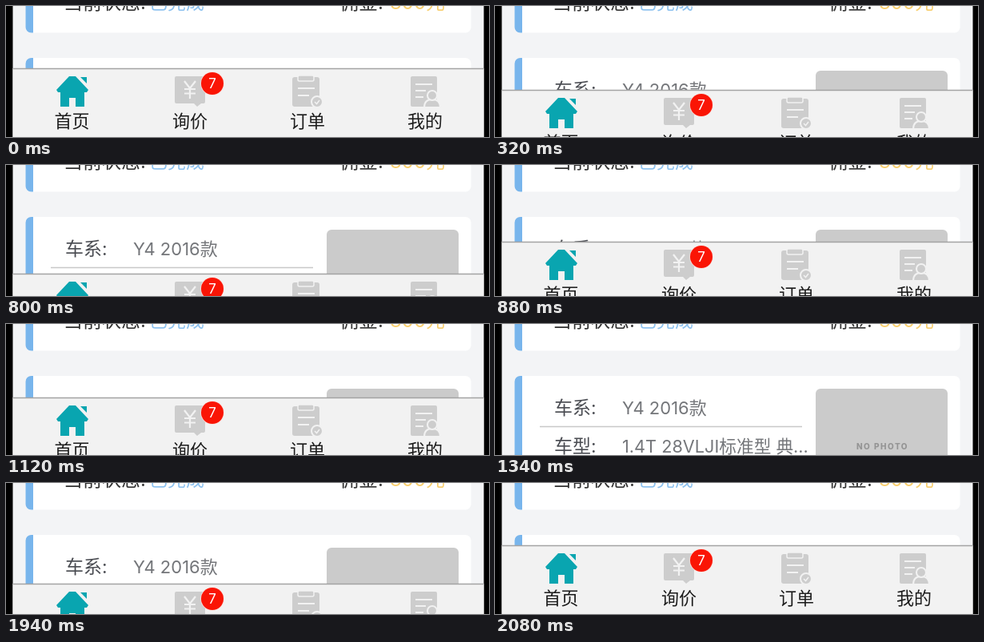
Animation of 604 by 164 pixels, one loop 2200 ms. Source, as an HTML page:

```html
<!DOCTYPE html>
<html lang="zh">
<head>
<meta charset="utf-8">
<style>
html, body { margin: 0; width: 100%; height: 100%; overflow: hidden; background: #000; }
svg { display: block; }
text { font-family: Inter, "Noto Sans CJK SC", "Noto Sans CJK", sans-serif; font-size: 22px; }
.head { font-size: 24px; fill: #333; }
.label { font-size: 23px; fill: #4a4c52; }
.value { fill: #74767a; }
.tab { fill: #1c1c1c; text-anchor: middle; }
.grey { fill: #cdcdcd; }
.line { stroke: #f2f2f2; stroke-width: 2.2; fill: none; }
</style>
</head>
<body>
<svg width="604" height="164" viewBox="0 0 604 164">
  <defs>
    <clipPath id="screen"><rect x="8.5" width="589" height="164"/></clipPath>
    <clipPath id="cards">
      <rect x="24.500" y="-40" width="557" height="73.5" rx="7"/>
      <rect x="24.500" y="65" width="557" height="140" rx="7"/>
    </clipPath>
  </defs>
  <g clip-path="url(#screen)">
    <rect width="604" height="164" fill="#f3f4f6"/>
    <g clip-path="url(#cards)">
      <rect width="604" height="164" fill="#fff"/>
      <rect x="24" width="10" height="164" fill="#78b5ec"/>
    </g>

    <text class="head" x="72" y="4">当前状态:</text>
    <text class="head" x="179" y="4" style="fill:#8cc1ef;font-size:23px">已完成</text>
    <text class="head" x="417" y="4">佣金:</text>
    <text class="head" x="480" y="4" style="fill:#f8cf70">300元</text>

    <text class="label" x="74" y="113">车系:</text>
    <text class="value" x="159" y="112.500">Y4 2016款</text>
    <path d="M56 128.500H384" stroke="#c8c8c8" stroke-width="1.5"/>
    <text class="label" x="74" y="161">车型:</text>
    <text class="value" x="159" y="160.500" style="font-size:21.7px">1.4T 28VLJI标准型 典...</text>
    <rect x="401" y="81" width="165" height="120" rx="6" fill="#cbcbcb"/>
    <text x="484.500" y="157" text-anchor="middle" style="font-size:10px;font-weight:800;letter-spacing:1.5px;fill:#949494">NO PHOTO</text>

    <g id="bar">
      <rect x="8" y="78" width="590" height="100" fill="#f2f2f2"/>
      <path d="M8 78.500H598" stroke="#a3a3a3" stroke-width="1.5"/>

      <g fill="#09a5b0">
        <path d="M79 88H87L103 105L101 108H98V126H87V115H79V126H68V108H65L63 105Z"/>
        <path d="M93 89H101V97Z"/>
      </g>

      <path class="grey" d="M213 88H247Q249 88 249 90V120Q249 122 247 122H244L239 126L235 122H213Q211 122 211 120V90Q211 88 213 88Z"/>
      <path class="line" d="M223 94L230 103L237 94M230 103V116M223 104H237M223 109.500H237"/>
      <circle cx="258" cy="97" r="14.8" fill="#fbdcd8"/>
      <circle cx="258" cy="97" r="14" fill="#fa1505"/>
      <text x="258" y="103" text-anchor="middle" style="font-size:17px;fill:#fff">7</text>

      <rect class="grey" x="358" y="89" width="34" height="37" rx="3"/>
      <rect x="365" y="87" width="20" height="7" rx="2" fill="#cdcdcd" stroke="#f2f2f2" stroke-width="1.5"/>
      <path class="line" d="M365 103H386M365 112H379"/>
      <circle class="grey" cx="389" cy="120" r="7" stroke="#f2f2f2" stroke-width="2"/>
      <path class="line" d="M386 120L388.500 122.500L392 118" style="stroke-width:1.5"/>

      <rect class="grey" x="506" y="88" width="33" height="38" rx="2"/>
      <path class="line" d="M512 98H533M512 106H525M512 114H522"/>
      <g class="grey" stroke="#f2f2f2" stroke-width="2">
        <path d="M523 127Q523 117 533 117Q543 117 543 127Z"/>
        <circle cx="533" cy="112" r="6"/>
      </g>

      <text class="tab" x="82.500" y="152">首页</text>
      <text class="tab" x="230" y="152">询价</text>
      <text class="tab" x="377" y="152">订单</text>
      <text class="tab" x="524" y="152">我的</text>
    </g>
  </g>
</svg>
<script>
const LOOP = 2200, STEP = 20, DURATION = 260, TRAVEL = 88;
// Each move: when it takes over, when its easing starts, whether it hides the bar.
// Showing skips the slow opening of its curve, so the bar jumps into view.
const moves = [
  [0, 222, true],
  [800, 697, false],
  [1040, 1051, true],
  [1920, 1817, false]
];
const bar = document.getElementById("bar");

function ease(x) {
  return (1 - Math.cos(Math.PI * Math.min(1, Math.max(0, x)))) / 2;
}

function draw(t) {
  const [, start, hiding] = moves.findLast(([from]) => t >= from);
  const p = ease((t - start) / DURATION);
  const y = Math.round(TRAVEL * (hiding ? p : 1 - p));
  bar.setAttribute("transform", `translate(0 ${y})`);
}

const begin = performance.now();
function tick() {
  const t = (performance.now() - begin) % LOOP;
  draw(Math.floor(t / STEP) * STEP);
  requestAnimationFrame(tick);
}
tick();
</script>
</body>
</html>
```
